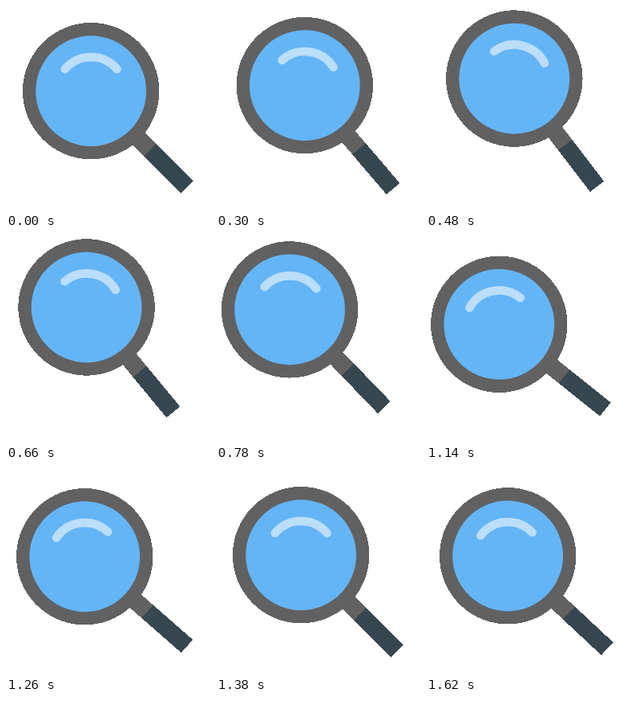
Recreate the animation shown at these times as an HTML page. Size 256 by 256 pixels, loop 1680 ms.

```html
<!DOCTYPE html>
<html lang="en">
<head>
<meta charset="utf-8">
<title>Magnifying glass</title>
<style>
  html, body { margin: 0; width: 100%; height: 100%; overflow: hidden; background: #fff; }
  svg { display: block; width: 100vw; height: 100vh; }
</style>
</head>
<body>
<svg viewBox="0 0 48 48">
  <!-- Drawn around the lens centre -->
  <g id="glass">
    <g shape-rendering="crispEdges">
      <g transform="rotate(45)">
        <rect x="14.9" y="-2.05" width="17.1" height="4.1" fill="#616161"/>
        <rect x="19.65" y="-2.05" width="12.35" height="4.1" fill="#37474f"/>
      </g>
      <circle r="16.07" fill="#616161"/>
    </g>
    <circle r="13" fill="#64b5f6"/>
    <path id="shine" d="M-6.1-5.15A8 8 0 0 1 6.1-5.15" fill="none" stroke="#bbdefb" stroke-width="2" stroke-linecap="round"/>
  </g>
</svg>
<script>
  const LOOP = 1680, STEP = 60;
  const MOVE_START = 120, MOVE_END = 1380;
  const TWITCH = 1620, TWITCH_POSE = 1320;
  const LENS = 20, PIVOT = 14.1; // along the diagonal, pivot measured from the lens

  const glass = document.getElementById('glass');
  const shine = document.getElementById('shine');

  // Sum of sine waves that is zero at both ends of the move
  const wave = (p, ...amplitudes) =>
    amplitudes.reduce((sum, a, i) => sum + a * Math.sin((i + 1) * Math.PI * p), 0);

  function pose(time) {
    const p = Math.min(Math.max((time - MOVE_START) / (MOVE_END - MOVE_START), 0), 1);
    const shift = wave(p, -2.39, 0.477, 0.446, -0.041);
    const tilt = wave(p, 1.28, 6.9, -0.97, -0.52);
    const at = LENS + shift;
    glass.setAttribute('transform', `translate(${at} ${at}) rotate(${tilt} ${PIVOT} ${PIVOT})`);
    shine.setAttribute('transform', `rotate(${0.75 * tilt})`);
  }

  const start = performance.now();

  function draw(now) {
    const elapsed = Math.max(0, now - start) % LOOP;
    pose(elapsed >= TWITCH ? TWITCH_POSE : Math.floor(elapsed / STEP) * STEP);
    requestAnimationFrame(draw);
  }
  draw(start);
</script>
</body>
</html>
```
